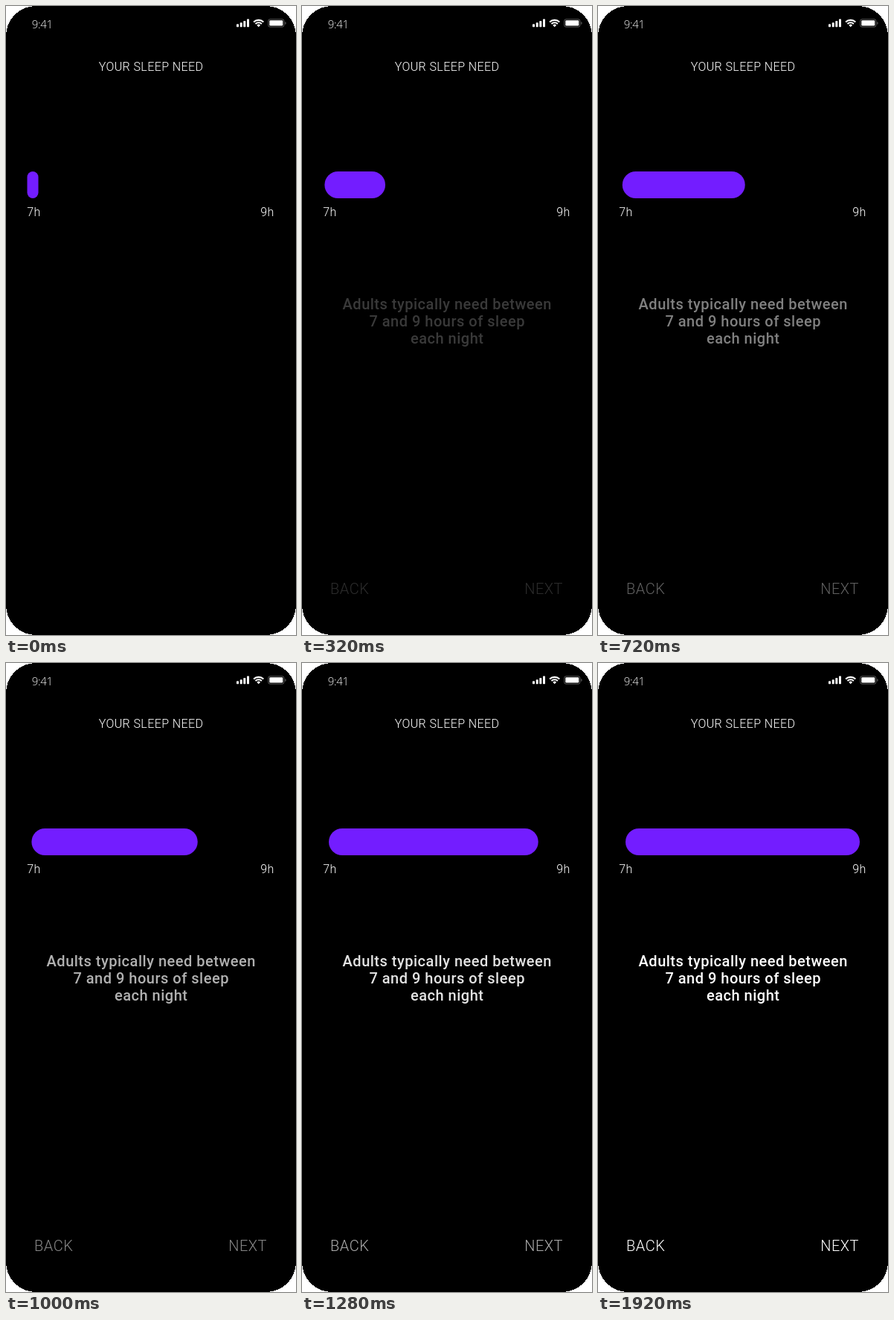
Animation of 390 by 844 pixels, one loop 1960 ms. Source, as an HTML page:

```html
<!DOCTYPE html>
<html lang="en">
<head>
<meta charset="utf-8">
<title>Your sleep need</title>
<style>
  html, body { margin: 0; width: 100%; height: 100%; overflow: hidden; background: #fff; }
  svg { display: block; width: 390px; height: 844px; }
  text { fill: #fff; font-family: Roboto, sans-serif; font-weight: 300; letter-spacing: .025em; white-space: pre; }
  .clock { font: 300 15px "Open Sans", sans-serif; letter-spacing: -.3px; }
  .label { font-size: 16px; }
  .info text { font-size: 20px; font-weight: 500; }
  .nav text { font-size: 20px; }
  .mid { text-anchor: middle; }
</style>
</head>
<body>
<svg viewBox="0 0 390 844">
  <rect width="390" height="844" rx="40" shape-rendering="crispEdges"/>

  <text class="clock" x="34.8" y="30">9:41</text>
  <g fill="#fff">
    <rect x="310" y="24.3" width="3" height="4" rx=".7"/>
    <rect x="314.7" y="22.3" width="3" height="6" rx=".7"/>
    <rect x="319.3" y="20" width="3" height="8.3" rx=".7"/>
    <rect x="324" y="17.6" width="3" height="10.7" rx=".7"/>
    <path d="M339.7 28.2l-2.4-2.4a3.4 3.4 0 0 1 4.8 0z"/>
    <rect x="354.3" y="19.3" width="18" height="7.3" rx="1.3"/>
    <path d="M375.3 20.9a2.2 2.2 0 0 1 0 4z" opacity=".4"/>
  </g>
  <g fill="none" stroke="#fff">
    <path d="M333.1 21.6a9.4 9.4 0 0 1 13.2 0M335.5 24a6 6 0 0 1 8.4 0" stroke-width="2.1"/>
    <rect x="352.8" y="17.8" width="21" height="10.3" rx="2.2" opacity=".35"/>
  </g>

  <text class="label mid" x="195" y="87">YOUR SLEEP NEED</text>
  <rect id="bar" y="222" height="36" fill="#731dff"/>
  <text class="label" x="28.3" y="282">7h</text>
  <text class="label" x="342.3" y="282">9h</text>

  <g id="info" class="info mid">
    <text x="195.2" y="407">Adults typically need between</text>
    <text x="195.2" y="430">7 and 9 hours of sleep</text>
    <text x="195.2" y="453">each night</text>
  </g>
  <g id="nav" class="nav">
    <text x="38" y="789">BACK</text>
    <text x="299.2" y="789">NEXT</text>
  </g>
</svg>
<script>
  const LOOP = 1960, STEP = 40, GROW = 1440, FADE = 1920;
  const [bar, info, nav] = ["bar", "info", "nav"].map(id => document.getElementById(id));
  const mix = (a, b, p) => a + (b - a) * p;
  const start = performance.now();

  function draw(t) {
    const p = Math.min(1, t / GROW);
    const width = mix(15, 315, p);
    bar.setAttribute("x", mix(28.5, 37, p));
    bar.setAttribute("width", width);
    bar.setAttribute("rx", Math.min(18, width / 2));
    info.setAttribute("opacity", p);
    nav.setAttribute("opacity", Math.min(1, t / FADE));
  }

  function tick() {
    const t = Math.max(0, performance.now() - start) % LOOP;
    draw(Math.floor(t / STEP) * STEP);
    requestAnimationFrame(tick);
  }
  draw(0);
  requestAnimationFrame(tick);
</script>
</body>
</html>
```
